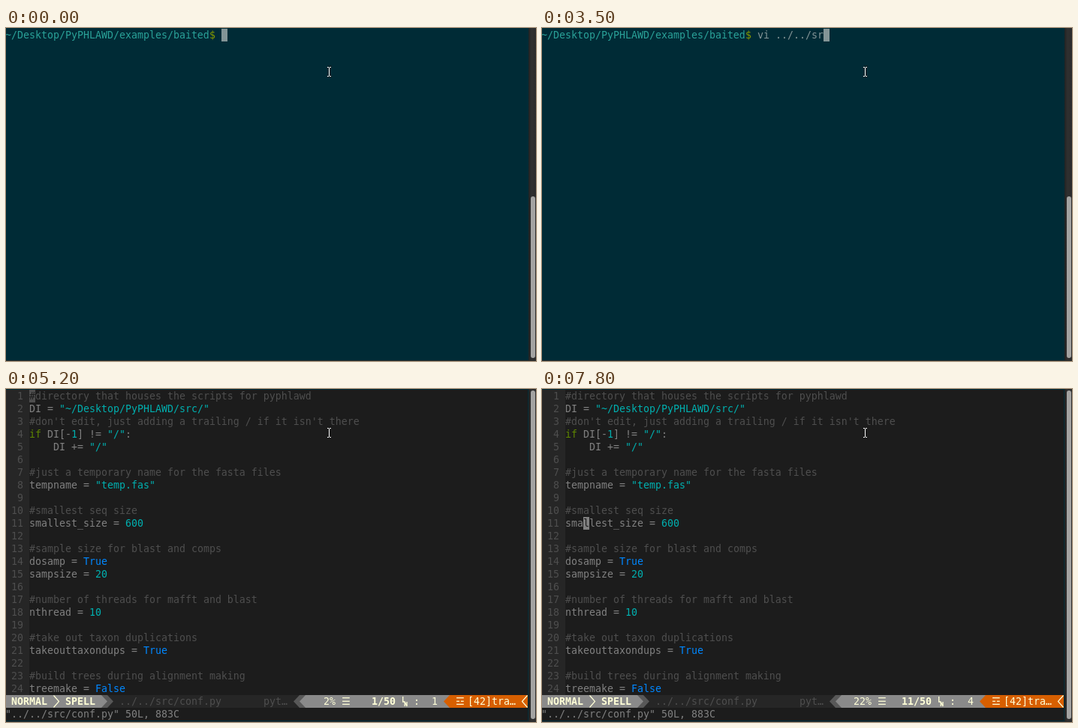
These frames come from a looping animation (706 by 445 pixels, 8 s). An HTML page:

```html
<!DOCTYPE html>
<html lang="en">
<head>
<meta charset="utf-8">
<title>Terminal</title>
<style>
  html, body { margin: 0; width: 100%; height: 100%; overflow: hidden; background: #002b36; }
  #stage { position: relative; width: 706px; height: 445px; overflow: hidden; background: #002b36;
    font: 13.29px/17px "DejaVu Sans Mono", monospace; }
  #stage * { position: absolute; white-space: pre; }
  #shell, #editor { inset: 0; }
  .cell { height: 17px; }
  .bold { font-weight: bold; }
  .wide { font-family: "DejaVu Sans", sans-serif; }
  svg { left: 0; top: 0; }
  #trough { left: 696px; top: 0; width: 10px; height: 445px; background: linear-gradient(90deg, #222, #303030 40%, #2b2b2b); }
  #thumb { left: 699px; width: 6px; border-radius: 3px; background: #a3a3a2; }
  #edge { left: 0; top: 444px; width: 706px; height: 1px; background: #2a2c2c; }
</style>
</head>
<body>
<div id="stage">
  <div id="shell"></div>
  <div id="editor"></div>
  <div id="trough"></div>
  <div id="thumb"></div>
  <div id="edge"></div>
  <svg width="706" height="445" shape-rendering="crispEdges">
    <path d="M428.5 51.5h5M430.5 51v14M428.5 64.5h5" fill="none" stroke="#1a1a1a" stroke-width="3" opacity=".4"/>
    <path d="M428 52.5h2M431 52.5h2M430.5 53v11M428 64.5h2M431 64.5h2" fill="none" stroke="#fff"/>
  </svg>
</div>
<script>
const LOOP = 8000, CW = 8, CH = 17;
const C = {
  text: '#808080', dim: '#4e4e4e', back: '#1c1c1c', gutter: '#262626', mid: '#585858',
  bar: '#8a8a8a', cream: '#ffffd7', orange: '#d75f00', cyan: '#00afaf', green: '#5f8700', blue: '#0087ff'
};
const $ = id => document.getElementById(id);
const shell = $('shell'), editor = $('editor'), thumb = $('thumb');
const px = col => col * CW - 1;
const py = row => row * CH + 1;

function put(parent, col, row, text, color, cls = '') {
  const el = document.createElement('span');
  el.className = 'cell ' + cls;
  el.textContent = text;
  el.style.cssText = `left:${px(col)}px;top:${py(row)}px;color:${color}`;
  parent.append(el);
  return el;
}
function fill(parent, col, row, cols, rows, color) {
  const el = put(parent, col, row, '', color);
  el.style.width = cols * CW + 'px';
  el.style.height = rows * CH + 'px';
  el.style.background = color;
  return el;
}

// Shell
put(shell, 0, 0, '~/Desktop/PyPHLAWD/examples/baited', '#2aa198');
put(shell, 34, 0, '$', '#859900');
const command = put(shell, 36, 0, '', '#839496');
const block = fill(shell, 36, 0, 1, 1, '#839496');

const typing = [
  [0, ''], [400, 'vi'], [500, 'vi '], [1000, 'vi .'], [1100, 'vi ..'], [1200, 'vi ../'],
  [1600, 'vi ../s'], [2600, 'vi ../'], [2800, 'vi ../.'], [3200, 'vi ../..'], [3300, 'vi ../../'],
  [3400, 'vi ../../s'], [3500, 'vi ../../sr'], [3800, 'vi ../../src/'], [4300, 'vi ../../src/c'],
  [4400, 'vi ../../src/con'], [4500, 'vi ../../src/conf'], [4700, 'vi ../../src/conf.py']
];
const ENTER = 5100, OPEN = 5200;

// Editor
const lines = `#directory that houses the scripts for pyphlawd
DI = "~/Desktop/PyPHLAWD/src/"
#don't edit, just adding a trailing / if it isn't there
if DI[-1] != "/":
    DI += "/"

#just a temporary name for the fasta files
tempname = "temp.fas"

#smallest seq size
smallest_size = 600

#sample size for blast and comps
dosamp = True
sampsize = 20

#number of threads for mafft and blast
nthread = 10

#take out taxon duplications
takeouttaxondups = True

#build trees during alignment making
treemake = False`.split('\n');

const rules = /(#.*)|("[^"]*"|\b\d+)|(\bif\b)|(\bTrue\b|\bFalse\b)|[^#"\dTFi]+|./g;
const tints = [C.dim, C.cyan, C.green, C.blue];

fill(editor, 0, 0, 87, 26, C.back);
fill(editor, 0, 0, 4, 24, C.gutter);
lines.forEach((line, row) => {
  put(editor, 0, row, String(row + 1).padStart(3), C.dim);
  for (const m of line.matchAll(rules)) {
    const kind = m.slice(1).findIndex(Boolean);
    put(editor, 4 + m.index, row, m[0], tints[kind] || C.text);
  }
});
put(editor, 0, 25, '"../../src/conf.py" 50L, 883C', C.text);
const caret = put(editor, 4, 0, '', C.back);
caret.style.width = CW + 'px';

// Status bar
const BAR = 24;
[[0, 16, C.bar], [16, 1, C.mid], [17, 31, C.gutter], [48, 1, C.gutter], [49, 1, C.mid],
 [50, 24, C.bar], [74, 13, C.orange]].forEach(([col, n, color]) => fill(editor, col, BAR, n, 1, color));

const label = (col, text, cls, color = C.cream) => put(editor, col, BAR, text, color, cls);
label(1, 'NORMAL', 'bold');
label(10, 'SPELL', 'bold');
label(19, '../../src/conf.py', '', C.dim);
label(43, 'pyt…', '', C.dim);
label(56, '☰', 'wide');
label(68, ':');
label(75, '☲', 'wide');
label(77, '[42]tra…');
const percent = label(52, ''), lineNo = label(60, '', 'bold'), colNo = label(70, '');

const top0 = py(BAR), mid0 = top0 + CH / 2, end0 = top0 + CH;
function wedge(col, dir, color, back) {
  const a = dir > 0 ? px(col) : px(col + 1), b = a + dir * CW;
  return `<rect x="${px(col)}" y="${top0}" width="${CW}" height="${CH}" fill="${back}"/>` +
    `<path d="M${a} ${top0}L${b} ${mid0}L${a} ${end0}Z" fill="${color}"/>`;
}
function chevron(col, dir) {
  const a = dir > 0 ? px(col) + .5 : px(col + 1) - .5, b = a + dir * (CW - 1);
  return `<path d="M${a} ${top0 + .5}L${b} ${mid0}L${a} ${end0 - .5}" fill="none" stroke="${C.cream}" stroke-width="1.2"/>`;
}
editor.insertAdjacentHTML('beforeend', `<svg width="706" height="445">` +
  wedge(16, 1, C.bar, C.mid) + wedge(17, 1, C.mid, C.gutter) +
  wedge(48, -1, C.mid, C.gutter) + wedge(49, -1, C.bar, C.mid) +
  wedge(73, -1, C.orange, C.bar) + chevron(8, 1) + chevron(86, -1) +
  `<path d="M528.7 411v7h2.6M531.2 424v-6l2.8 6v-6" fill="none" stroke="${C.cream}" stroke-width="1.3"/></svg>`);

// time, line, column
const moves = [
  [0, 1, 1], [5700, 2, 1], [5900, 3, 1], [6000, 4, 1], [6200, 5, 1], [6300, 6, 1], [6500, 7, 1],
  [6700, 8, 1], [6800, 9, 1], [7000, 10, 1], [7100, 11, 1], [7300, 11, 2], [7800, 11, 4]
];
const at = (steps, t) => steps.findLast(s => s[0] <= t);

function draw(t) {
  const open = t >= OPEN;
  shell.style.display = open ? 'none' : '';
  editor.style.display = open ? '' : 'none';
  thumb.style.top = open ? '2px' : '225px';
  thumb.style.height = open ? '439px' : '216px';

  const typed = at(typing, t)[1], entered = t >= ENTER;
  command.textContent = typed;
  block.style.left = px(entered ? 0 : 36 + typed.length) + 'px';
  block.style.top = py(entered ? 1 : 0) + 'px';

  const [, line, col] = at(moves, t), source = lines[line - 1];
  caret.textContent = source[col - 1] || ' ';
  caret.style.left = px(3 + col) + 'px';
  caret.style.top = py(line - 1) + 'px';
  caret.style.background = source[0] === '#' ? C.dim : C.text;
  percent.textContent = (line * 2 + '%').padStart(3);
  lineNo.textContent = (line + '/50').padStart(5);
  colNo.textContent = String(col).padStart(2);
}

const start = performance.now();
function tick(now) {
  draw(Math.max(0, now - start) % LOOP);
  requestAnimationFrame(tick);
}
draw(0);
requestAnimationFrame(tick);
</script>
</body>
</html>
```
